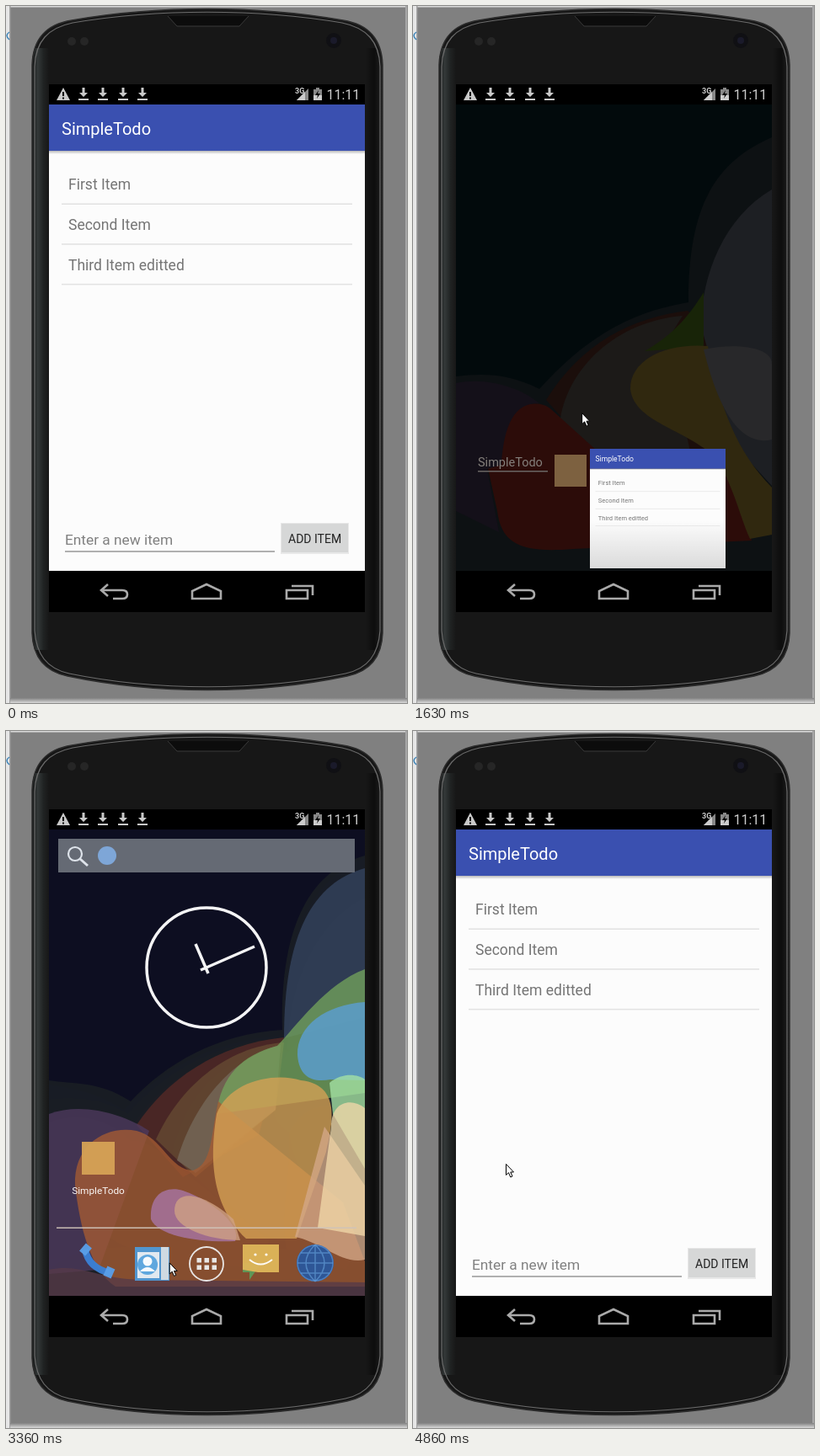
Animation, 476 px wide and 828 px high, one loop 7.76 s. Source, as an HTML page with a canvas:

```html
<!DOCTYPE html>
<html lang="en">
<head>
<meta charset="utf-8">
<title>Todo app on a phone</title>
<style>
html, body { margin: 0; width: 100%; height: 100%; overflow: hidden; background: #808080 }
canvas { display: block }
</style>
</head>
<body>
<canvas id="stage" width="476" height="828"></canvas>
<script>
const ctx = document.getElementById('stage').getContext('2d');
const LOOP = 7760;
const SCREEN = [51, 117, 375, 554];
const THUMB = [210, 526, 161, 142];
const ICON = [90, 488, 39, 39];

const clamp = x => Math.min(1, Math.max(0, x));
const span = (t, a, b) => clamp((t - a) / (b - a));
const smooth = x => x * x * (3 - 2 * x);
const lerp = (a, b, p) => a + (b - a) * p;
const mix = (a, b, p) => a.map((v, i) => lerp(v, b[i], p));

function fill(color, d) { ctx.fillStyle = color; ctx.fill(new Path2D(d)); }
function line(color, width, d) {
  ctx.strokeStyle = color; ctx.lineWidth = width; ctx.stroke(new Path2D(d));
}
function rect(color, x, y, w, h) { ctx.fillStyle = color; ctx.fillRect(x, y, w, h); }
function disc(color, x, y, r) {
  ctx.fillStyle = color; ctx.beginPath(); ctx.arc(x, y, r, 0, 7); ctx.fill();
}
function ring(color, width, x, y, r) {
  ctx.strokeStyle = color; ctx.lineWidth = width;
  ctx.beginPath(); ctx.arc(x, y, r, 0, 7); ctx.stroke();
}
function text(s, x, y, size, color, weight = 400, align = 'left') {
  ctx.font = `${weight} ${size}px Roboto, sans-serif`;
  ctx.textAlign = align; ctx.fillStyle = color; ctx.fillText(s, x, y);
}
function gradient(x0, y0, x1, y1, ...colors) {
  const g = ctx.createLinearGradient(x0, y0, x1, y1);
  colors.forEach((c, i) => g.addColorStop(i / (colors.length - 1), c));
  return g;
}
// Draws with its own alpha and optional clip box
function layer(alpha, clip, draw) {
  if (alpha <= 0) return;
  ctx.save();
  ctx.globalAlpha *= alpha;
  if (clip) { ctx.beginPath(); ctx.rect(...clip); ctx.clip(); }
  draw();
  ctx.restore();
}

// Wallpaper at three light levels, back to front
const DIM = [
  ['#020a0c', 'M51 117H426V671H51Z'],
  ['#0d1113', 'M426 156C360 185 327 235 327 352C250 365 200 400 150 455C110 435 80 437 51 440V671H426Z'],
  ['#1b0e0b', 'M326 362C260 370 200 400 158 468L240 560H400V420Z'],
  ['#1c1a18', 'M320 368C240 375 185 430 175 490L326 626 336 560 300 400Z'],
  ['#1d1f23', 'M426 218C370 250 342 320 342 380L380 520 426 570Z'],
  ['#182408', 'M345 340L345 405 275 410C310 390 330 365 345 340Z'],
  ['#2c0c09', 'M107 510C112 470 150 465 165 480L326 626 334 530 372 540 402 635 190 645C130 650 105 640 100 600L88 545Z'],
  ['#30280f', 'M350 404C300 400 258 420 258 455C262 490 310 500 345 525C375 545 385 600 400 633L426 628V572C385 530 365 480 350 404Z'],
  ['#28282a', 'M345 408C380 400 426 404 426 425V515C385 525 360 470 345 408Z'],
  ['#141019', 'M51 448C90 440 130 455 150 472C115 470 107 510 105 545L88 550 102 625 51 600Z']
];
const MID = [
  ['#0d1313', 'M51 117H426V671H51Z'],
  ['#121630', 'M426 150C370 175 328 230 328 362C260 365 190 395 140 450C100 425 75 425 51 420V671H426Z'],
  ['#282022', 'M326 365C240 370 180 415 145 455C110 435 80 435 51 438V671H426Z'],
  ['#35455f', 'M426 198C370 225 332 300 334 390L426 360Z'],
  ['#4e2a26', 'M334 378C250 375 190 410 153 465L300 605H400V400Z'],
  ['#5f4a30', 'M334 379C260 380 215 430 198 500L300 605 350 480Z'],
  ['#75685a', 'M335 380C265 385 235 450 243 530C270 575 300 600 330 605L350 500Z'],
  ['#4f3a5e', 'M51 465C90 450 130 465 150 490L115 640H51Z'],
  ['#5c4a48', 'M51 640C110 590 180 630 426 610V671H51Z'],
  ['#a25a32', 'M107 575C108 545 118 540 126 505C140 480 160 485 180 498L312 605 300 638 200 632C140 615 107 600 107 575ZM336 475C340 520 325 570 333 615L404 640 426 590Z'],
  ['#72a25c', 'M426 340C380 332 325 370 316 425C312 455 325 475 340 478L426 430Z'],
  ['#d6a050', 'M336 478C350 450 370 445 383 447C395 418 415 422 426 428V627H404C400 590 340 530 336 478Z'],
  ['#b0a696', 'M385 430L395 425 426 500V540L400 505Z'],
  ['#5a9fd8', 'M372 400L380 403 399 458 392 463Z']
];
const FULL = [
  ['#0e0d26', 'M51 117H426V671H51Z'],
  ['#1b2025', 'M426 148C365 165 325 225 328 355C250 360 190 395 148 440C110 415 80 420 51 415V671H426Z'],
  ['#35455f', 'M426 163C365 180 330 240 330 365L426 340Z'],
  ['#572a26', 'M330 364C250 372 190 415 155 468L210 530 300 480Z'],
  ['#664b33', 'M330 370C260 375 205 425 178 485L225 530 320 450Z'],
  ['#75685a', 'M326 373C275 385 225 435 203 510L225 525 320 450Z'],
  ['#72a25c', 'M426 283C380 300 345 350 322 374C280 385 255 410 250 455L426 430Z'],
  ['#4f3a5e', 'M51 455C90 440 140 455 170 475L110 640 51 645Z'],
  ['#a55c33', 'M82 540C80 490 120 468 155 475C185 482 195 522 222 522C245 515 243 480 252 440L400 560 426 630V660H130C100 640 88 590 82 540Z'],
  ['#d6a255', 'M250 455C265 415 320 405 350 415C395 420 390 460 380 500L345 603H285C240 560 243 500 250 455Z'],
  ['#d4a888', 'M378 470L426 540V628C400 635 370 605 343 601Z'],
  ['#5a9fd8', 'M426 322C380 325 345 350 346 385C348 412 365 418 385 414L426 415Z'],
  ['#a4e3a4', 'M384 418C400 405 418 408 426 414V520L388 455Z'],
  ['#f0d8a8', 'M386 470C386 440 410 435 426 448V600L370 590Z'],
  ['#a877a8', 'M172 580C170 550 190 540 210 546C250 560 280 590 272 606C230 608 180 600 172 580Z'],
  ['#d0a284', 'M200 570C200 545 230 545 270 580L278 605C240 605 200 590 200 570Z'],
  ['#573a48', 'M51 640C90 632 105 650 160 652L426 655V671H51Z']
];
const wallpaper = (shapes, alpha) =>
  layer(alpha, SCREEN, () => shapes.forEach(([color, d]) => fill(color, d)));

function phone() {
  rect('#808080', 0, 0, 476, 828);
  rect('#d8d8d8', 0, 0, 476, 1.5);
  rect('#e6e6e6', 0, 0, 4, 828);
  rect('#a0a0a0', 4, 0, 1.5, 828);
  rect('#a6a6a6', 474, 0, 2, 828);
  rect(gradient(0, 822, 0, 828, '#808080', '#d8d8d8'), 5, 822, 471, 6);
  line('#3c84b8', 1.5, 'M4 31Q-2 35 4 40');
  const body = 'M31 70C32 40 46 22 78 17C180 -1 298 -1 400 17C432 22 446 40 447 70V745C446 772 434 790 405 796C300 818 178 818 73 796C44 790 32 772 31 745Z';
  fill('#171717', body);
  ctx.save();
  ctx.clip(new Path2D(body));
  rect(gradient(31, 0, 51, 0, '#141515', '#343939', '#202323', '#171717'), 31, 50, 20, 715);
  rect(gradient(427, 0, 447, 0, '#171717', '#0d0d0d', '#202020'), 427, 50, 20, 715);
  ctx.restore();
  line('#2c2c2c', 1.5, body);
  line('#6c6c6c', 1.2, 'M34 742V72C35 42 50 26 79 20C180 3 298 3 399 20C428 26 443 42 444 72V742C442 770 430 787 403 793C300 814 178 814 75 793C48 787 36 770 34 742Z');
  fill('#0c0c0c', 'M192 12H288L277 24H203Z');
  line('#3a3a3a', 1, 'M192 12L203 24H277L288 12');
  disc('#262626', 78, 42, 5); disc('#262626', 93, 42, 5);
  disc('#101014', 389, 41, 9); disc('#1a1a2a', 389, 41, 4);
}

function statusBar() {
  rect('#000', 51, 93, 375, 24);
  fill('#c9c9c9', 'M68 97L76 112H60Z');
  rect('#000', 67, 102, 2, 5); rect('#000', 67, 108.5, 2, 2);
  for (const x of [92, 115, 139, 162])
    fill('#c9c9c9', `M${x - 1.5} 97h3v6h3.5l-5 5-5-5h3.5ZM${x - 6} 110h12v2h-12Z`);
  text('3G', 343, 104, 9, '#ccc', 700);
  fill('#888', 'M359 98V112H345Z');
  fill('#ccc', 'M355 102V112H345Z');
  fill('#888', 'M368 97h4v2h3v13h-10v-13h3Z');
  fill('#ccc', 'M365 106h10v6h-10Z');
  fill('#000', 'M371 100l-4 6h3l-1 4 4-6h-3Z');
  text('11:11', 380.5, 111, 16, '#ccc');
}

function navBar(t) {
  rect('#000', 51, 671, 375, 49);
  const glow = span(t, 1120, 1200) * (1 - span(t, 1440, 1600));
  layer(glow, [51, 671, 375, 49], () => disc('#191919', 348, 697, 46));
  const c = '#aaa';
  line(c, 2.6, 'M121 687L113 694 121 701M114 694H138Q144 694 144 699T138 704H127');
  line(c, 2.6, 'M221 704V695L238 687 255 695V704Z');
  line(c, 2.6, 'M333 694H358V704H333ZM339 689H364V700');
}

function app(content = 1) {
  rect('#fcfcfc', 51, 172, 375, 499);
  rect(gradient(0, 172, 0, 176, '#b8b8b8', '#fcfcfc'), 51, 172, 375, 4);
  rect('#3a50b0', 51, 117, 375, 55);
  layer(content, null, () => {
    text('SimpleTodo', 66, 153, 20, '#fff');
    ['First Item', 'Second Item', 'Third Item editted'].forEach((s, i) => {
      text(s, 74, 218 + 48 * i, 17.5, '#757575');
      rect('#e2e2e2', 66, 234.5 + 47.7 * i, 345, 1.5);
    });
    text('Enter a new item', 70, 640, 17.3, '#808080');
    rect('#b0b0b0', 70, 647, 249, 2);
    rect('#e8e8e8', 326, 614, 81, 37);
    rect('#d6d7d7', 327, 615, 79, 34);
    text('ADD ITEM', 335, 638, 14, '#222');
  });
}
// Maps the app onto a window; a taller source scale is cropped by the clip
function appIn([x, y, w, h], scaleY, alpha, content) {
  layer(alpha, [x, y, w, h], () => {
    ctx.translate(x, y);
    ctx.scale(w / SCREEN[2], scaleY);
    ctx.translate(-SCREEN[0], -SCREEN[1]);
    app(content);
  });
}

function thumb() {
  appIn(THUMB, THUMB[2] / SCREEN[2], 1);
  const [x, y, w, h] = THUMB;
  rect(gradient(0, y + 85, 0, y + h, '#0000', '#0002'), x, y + 85, w, h - 85);
}

function recents(t) {
  const p = smooth(span(t, 1240, 1540));
  if (p < 1) {
    // Height shrinks slightly later than width
    const [x, , w] = mix(SCREEN, THUMB, p);
    const [, y, , h] = mix(SCREEN, THUMB, p ** 1.12);
    const ah = h * (1 - .1 * p);
    if (p > 0) appIn([x, y, w, h], THUMB[2] / SCREEN[2] * h / THUMB[3], 1);
    appIn([x, y + h - ah, w, ah], ah / SCREEN[3], 1 - p);
    return;
  }
  const dx = t < 1960 ? 0 : cursorAt(Math.min(t, 2470))[0] - 300;
  layer(t > 2450 ? 0 : 1 + dx / 270, SCREEN, () => {
    ctx.translate(dx, 0);
    thumb();
    layer(span(t, 1540, 1620), null, () => {
      text('SimpleTodo', 77, 547, 14.5, '#85807c');
      rect('#6a6664', 77, 552, 83, 1.5);
      rect('#7d6140', 168, 533, 38, 38);
    });
  });
}

function home(t) {
  rect('#707070', 62, 128, 352, 40);
  layer(1 - span(t, 3080, 3440), null, () => rect('#50688f', 62, 128, 352, 40));
  ring('#e4e9f0', 2.2, 82, 146, 8);
  line('#e4e9f0', 3, 'M88 152L97 160');
  disc('#7fa9dc', 120, 148, 11);
  ring('#fff', 3.5, 238, 281, 71);
  line('#fff', 3.5, 'M225 253L240 288M231 284L295 256');
  if (t >= 4150) disc('#b07aa8', 107, 510, 27);
  rect('#d6a255', ...ICON);
  text('SimpleTodo', 109.5, 550, 11.8, '#fff', 400, 'center');
  rect('#cfc3b8', 60, 589.5, 356, 1.5);
  // Dock
  line('#3b82d8', 8, 'M94 616Q98 638 124 644');
  line('#5a9fe8', 12, 'M91 613L98 619M118 641L127 645');
  rect('#4f9ad8', 153, 613, 41, 40);
  rect('#e8eef2', 156, 619, 26, 31); rect('#d6dde2', 184, 613, 9, 39);
  disc('#58a4dc', 168, 634, 12); disc('#fff', 168, 630, 5.5);
  fill('#fff', 'M159 642Q168 632 177 642Z');
  ring('#eee', 1.8, 238, 633, 20);
  for (let i = 0; i < 6; i++) rect('#eee', 226.5 + i % 3 * 9, 626 + (i > 2) * 8.5, 5.5, 5.5);
  fill('#5e9a58', 'M281 632H303L289 652V643H281Z');
  fill('#dfb65a', 'M281 610H324V643H299L281 640Z');
  disc('#fff', 296, 622, 1.6); disc('#fff', 309, 622, 1.6);
  line('#fff', 2, 'M289 628Q302 639 316 628');
  disc('#2a579c', 367, 632, 22);
  layer(.6, null, () => {
    ring('#5f9de0', 1.5, 367, 632, 21);
    line('#6aa6e0', 1.5, 'M346 632H388M350 620H384M350 644H384M367 610V654M367 610Q345 632 367 654M367 610Q389 632 367 654');
  });
}

// Pointer path: time, x, y
const PATH = [
  [60, 478, 826], [450, 400, 765], [830, 352, 712], [1160, 350, 709], [1240, 346, 704],
  [1360, 290, 646], [1500, 228, 530], [1630, 200, 483], [1720, 215, 498], [1960, 300, 585],
  [2200, 140, 602], [2470, 19, 609], [2560, 70, 620], [2740, 200, 655], [2860, 230, 680],
  [3030, 230, 682], [3160, 230, 680], [3520, 165, 593], [4000, 110, 514]
];
function cursorAt(t) {
  const i = PATH.findIndex(k => k[0] > t);
  if (i < 0) return PATH[PATH.length - 1].slice(1);
  const a = PATH[Math.max(0, i - 1)], b = PATH[i];
  return mix(a, b, span(t, a[0], b[0])).slice(1);
}
function cursor(t) {
  if (t < 60) return;
  ctx.save();
  ctx.translate(...cursorAt(t));
  const d = 'M.5 .5V13.5L3.5 10.7 5.8 16 8 15 5.8 10H9.5Z';
  fill('#fff', d);
  line('#000', 1, d);
  ctx.restore();
}

function draw(t) {
  phone();
  rect('#000', ...SCREEN);
  if (t < 2740) {
    wallpaper(DIM, .4 + .6 * span(t, 1240, 1540));
    recents(t);
  } else if (t < 4540) {
    wallpaper(DIM, 1);
    wallpaper(MID, span(t, 2860, 3020));
    wallpaper(FULL, span(t, 3080, 3440));
    layer(.6 * span(t, 2860, 3020) + .4 * span(t, 3080, 3400), SCREEN, () => home(t));
    if (t >= 4320) {
      const p = 1 - (1 - span(t, 4280, 4540)) ** 2;
      const win = mix(ICON, SCREEN, p);
      appIn(win, win[3] / SCREEN[3], .4 + .6 * p, 0);
    }
  } else app(span(t, 4700, 4860));
  statusBar();
  navBar(t);
  cursor(t);
}

const start = performance.now();
function frame() {
  draw((performance.now() - start) % LOOP);
  requestAnimationFrame(frame);
}
frame();
</script>
</body>
</html>
```
